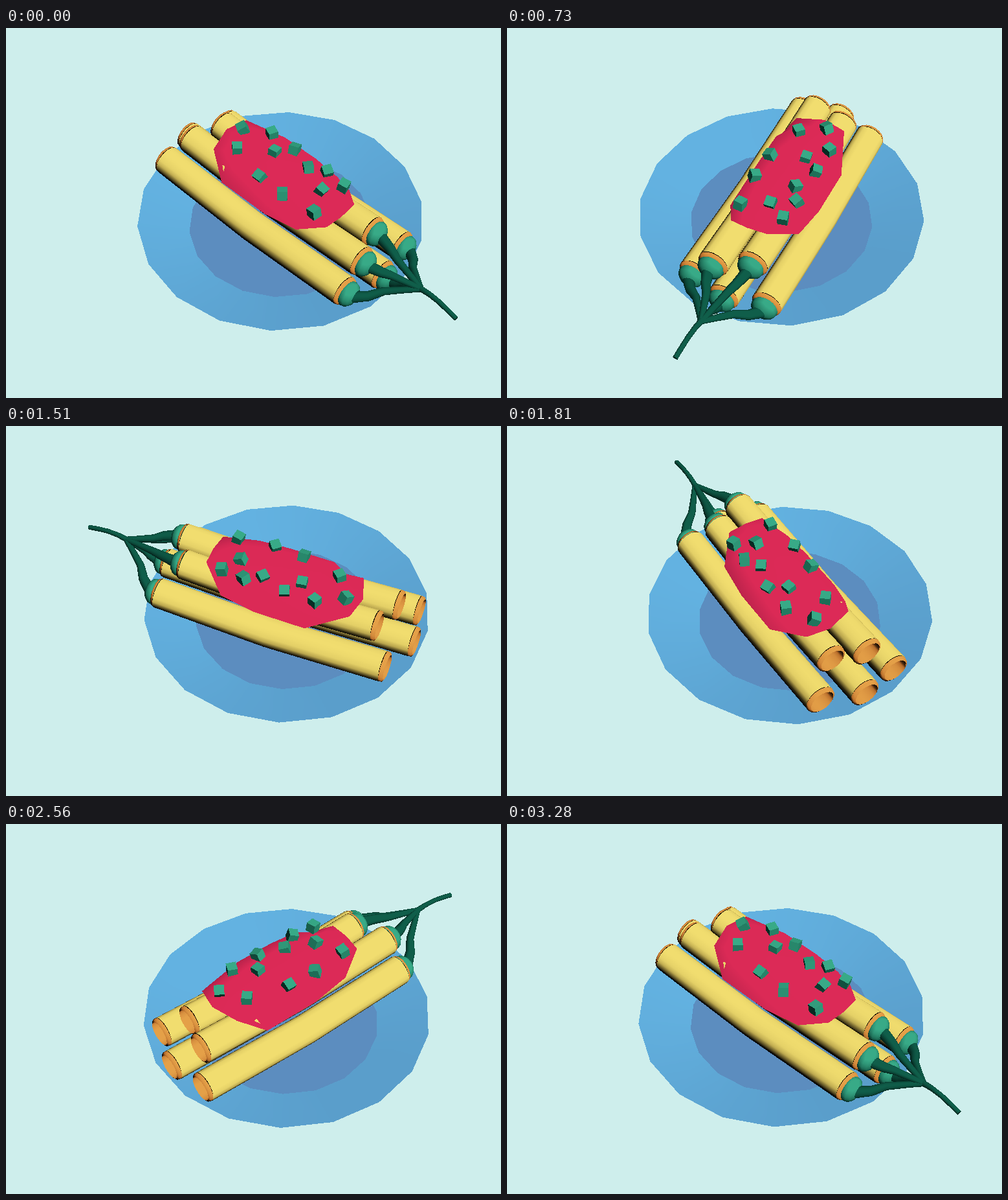
These frames come from a looping animation (765 by 571 pixels, 3310 ms). An HTML page with a canvas:

```html
<!DOCTYPE html>
<html lang="en">
<head>
<meta charset="utf-8">
<title>Turntable dish</title>
<style>
html, body { margin: 0; width: 100%; height: 100%; overflow: hidden; background: #ceeeec; }
canvas { display: block; }
</style>
</head>
<body>
<canvas id="stage" width="765" height="571"></canvas>
<script>
const W = 765, H = 571, TAU = Math.PI * 2;
const ctx = document.getElementById('stage').getContext('2d');
const image = ctx.createImageData(W, H);
const pixels = new Uint32Array(image.data.buffer);
const nearness = new Float32Array(W * H);

const rgb = (r, g, b) => (255 << 24 | b << 16 | g << 8 | r) >>> 0;
const BACK = rgb(206, 238, 236);

// Colour ramp over brightness 0..1, from stops [level, r, g, b].
function ramp(...stops) {
  return Uint32Array.from({ length: 256 }, (_, i) => {
    const v = i / 255;
    let k = 0;
    while (k < stops.length - 2 && v > stops[k + 1][0]) k++;
    const p = stops[k], q = stops[k + 1];
    const f = Math.min(1, Math.max(0, (v - p[0]) / (q[0] - p[0])));
    return rgb(...[1, 2, 3].map(c => Math.round(p[c] + (q[c] - p[c]) * f)));
  });
}
const YELLOW = ramp([0, 10, 8, 2], [.1, 72, 62, 28], [.37, 186, 166, 78], [.6, 227, 207, 102], [.85, 241, 221, 111]);
const ORANGE = ramp([0, 24, 12, 4], [.25, 180, 106, 42], [.5, 210, 138, 60], [.9, 228, 160, 72]);
const GREEN = ramp([0, 6, 42, 34], [.3, 28, 106, 84], [.85, 56, 170, 135]);
const STEM = ramp([0, 5, 36, 29], [.85, 16, 94, 74]);
const SAUCE = ramp([0, 130, 22, 54], [.35, 178, 33, 72], [.65, 219, 42, 86], [1, 220, 42, 87]);
const RIM = ramp([.67, 90, 158, 203], [.95, 99, 178, 225]);
const WELL = ramp([0, 91, 140, 190], [1, 92, 141, 191]);

// Model space: a runs along the rolls towards the stem, b across them, h is up.
const verts = [], faces = [];
function vert(pos, normal) {
  const len = Math.hypot(...normal);
  const v = { pos, normal: normal.map(n => n / len) };
  verts.push(v);
  return v;
}
function quad(mat, p, q, r, s) {
  faces.push([mat, p, q, r], [mat, p, r, s]);
}
function grid(mat, rows) {
  for (let i = 1; i < rows.length; i++) {
    const n = rows[i].length;
    for (let j = 0; j < n; j++) {
      const k = (j + 1) % n;
      quad(mat, rows[i - 1][j], rows[i - 1][k], rows[i][k], rows[i][j]);
    }
  }
}
const around = (n, make) => Array.from({ length: n }, (_, j) => make((j + .5) / n * TAU));

// Round skin along path points [a, b, h, radius]; side -1 lights the inside.
function sweep(mat, path, side = 1) {
  grid(mat, path.map((p, i) => {
    const prev = path[Math.max(i - 1, 0)], next = path[Math.min(i + 1, path.length - 1)];
    const step = [0, 1, 2].map(k => next[k] - prev[k]);
    const len = Math.hypot(...step), d = step.map(x => x / len);
    const slope = (next[3] - prev[3]) / len;
    const m = Math.hypot(d[0], d[1]);
    const u = [d[1] / m, -d[0] / m, 0];
    const w = [u[1] * d[2], -u[0] * d[2], u[0] * d[1] - u[1] * d[0]];
    return around(18, t => {
      const out = u.map((x, k) => x * Math.cos(t) + w[k] * Math.sin(t));
      return vert(out.map((x, k) => p[k] + x * p[3]), out.map((x, k) => (x - slope * d[k]) * side));
    });
  }));
}

function plate() {
  const circle = (r, h, tilt) => around(18, t => {
    const x = Math.cos(t), y = Math.sin(t);
    return vert([x * r - 1, y * r + 7.3, h], [-x * tilt, -y * tilt, 1]);
  });
  grid(RIM, [circle(220.5, 0, .3), circle(142, -24, .3)]);
  grid(WELL, [circle(142, -24, 0), circle(0, -24, 0)]);
}

const JOINT = [270, 0, 47];
function roll(a0, a1, b, h) {
  const R = 23.5, along = list => list.map(([a, r]) => [a, b, h, r]);
  const body = [];
  for (let i = 0; i <= 10; i++) {
    const f = i / 10;
    body.push([a0 + 5 + (a1 - a0 - 7) * f, b, h - 8 * (1 - Math.abs(2 * f - 1)), R]);
  }
  sweep(YELLOW, body);
  sweep(ORANGE, along([[a0 + 5, R], [a0 + 1, 22.8], [a0 - 1, 19.5]]));
  sweep(ORANGE, along([[a0 - 1, 19.5], [a0 + 45, 19.5]]), -1);
  sweep(ORANGE, along([[a1 - 2, R], [a1 + 2, 22], [a1 + 3, 18]]));
  sweep(GREEN, along([[a1 + 1, 18], [a1 + 5, 20.5], [a1 + 11, 19], [a1 + 16, 14], [a1 + 19, 7], [a1 + 20, 2]]));
  const tip = [a1 + 14, b, h];
  const at = (f, r, shift) => [...tip.map((x, k) => x + (JOINT[k] - x) * f + (k ? 0 : shift)), r];
  sweep(STEM, [at(0, 9, 0), at(.22, 7.5, 2), at(.5, 6, -5), at(.75, 5, -3), at(1, 4, 0)]);
}

function sauce() {
  const edge = [[118, 4, 86], [115, 32, 85], [75, 54, 66], [14, 58, 56], [-76, 58, 56], [-114, 36, 85],
    [-128, -6, 87], [-121, -42, 85], [-60, -66, 56], [20, -66, 56], [78, -60, 62], [116, -27, 86]];
  const rings = [[1, 0, 1.3], [.8, 89, .7], [.45, 92, .25], [0, 93, 0]];
  grid(SAUCE, rings.map(([f, top, lean]) => edge.map(([a, b, h]) => {
    const da = a + 5, db = b + 4;
    return vert([da * f - 5, db * f - 4, top || h], [da / 400 * lean, db / 62 * lean, 1]);
  })));
}

function cube(a, b, i) {
  const yaw = i * 2.4 + .4, tip = Math.sin(i * 5.1) * .45, size = 7.5;
  const c = Math.cos(yaw), s = Math.sin(yaw), ct = Math.cos(tip), st = Math.sin(tip);
  const axes = [[c, s, 0], [-s * ct, c * ct, st], [s * st, -c * st, ct]];
  for (let k = 0; k < 3; k++) for (const side of [-1, 1]) {
    const n = axes[k].map(x => x * side), u = axes[(k + 1) % 3], w = axes[(k + 2) % 3];
    quad(GREEN, ...[[-1, -1], [1, -1], [1, 1], [-1, 1]].map(([p, q]) =>
      vert([a, b, 95].map((x, j) => x + size * (n[j] + p * u[j] + q * w[j])), n)));
  }
}

plate();
roll(-200, 181, 62, 20);
roll(-177, 181, 28, 59);
roll(-213, 201, 1.5, 20);
roll(-161, 157, -24, 61);
roll(-189, 186, -60, 20);
sweep(STEM, [[268, 0, 47, 4.5], [285, 1, 50, 4], [303, 2, 50, 3.8], [320, 3, 47, 3.8], [337, 4, 43, 3.8]]);
sauce();
[[-66, -42], [-18, -42], [48, -42], [85, -38], [-106, -19], [-36, -17], [23, -28], [67, -9],
  [-82, 17], [-18, 34], [30, 36], [88, 30]].forEach(([a, b], i) => cube(a, b, i));

// Camera looks down at the turntable; the light stays with the camera.
const DIST = 2057, SIN = .76, COS = .65, LIGHT = [.35, .39, .85];
function project(v, c, s) {
  const [a, b, h] = v.pos, [na, nb, nh] = v.normal;
  const x = a * c - b * s, z = a * s + b * c;
  v.w = DIST / (DIST - z * COS - h * SIN);
  v.x = 430 + x * v.w;
  v.y = 283.3 + (z * SIN - h * COS) * v.w;
  const lit = (na * c - nb * s) * LIGHT[0] + (na * s + nb * c) * LIGHT[1] + nh * LIGHT[2];
  v.lit = 255 * Math.min(1, Math.max(0, lit));
}

function fill([mat, p, q, r]) {
  const qx = q.x - p.x, qy = q.y - p.y, rx = r.x - p.x, ry = r.y - p.y;
  const area = qx * ry - rx * qy;
  if (Math.abs(area) < 1e-6) return;
  const x0 = Math.max(0, Math.ceil(Math.min(p.x, q.x, r.x) - .5));
  const x1 = Math.min(W - 1, Math.floor(Math.max(p.x, q.x, r.x) - .5));
  const y0 = Math.max(0, Math.ceil(Math.min(p.y, q.y, r.y) - .5));
  const y1 = Math.min(H - 1, Math.floor(Math.max(p.y, q.y, r.y) - .5));
  for (let y = y0; y <= y1; y++) {
    const dy = y + .5 - p.y;
    for (let x = x0; x <= x1; x++) {
      const dx = x + .5 - p.x;
      const f = (dx * ry - rx * dy) / area, g = (qx * dy - dx * qy) / area;
      if (f < -1e-6 || g < -1e-6 || f + g > 1.000001) continue;
      const w = p.w + (q.w - p.w) * f + (r.w - p.w) * g, i = y * W + x;
      if (w <= nearness[i]) continue;
      nearness[i] = w;
      pixels[i] = mat[Math.min(255, Math.max(0, p.lit + (q.lit - p.lit) * f + (r.lit - p.lit) * g)) | 0];
    }
  }
}

function draw(step) {
  const turn = 43.1 + 3.357 * step - .35 - 1.15 * Math.sin((step - 12) / 107.3 * TAU);
  const c = Math.cos(turn * TAU / 360), s = Math.sin(turn * TAU / 360);
  pixels.fill(BACK);
  nearness.fill(0);
  verts.forEach(v => project(v, c, s));
  faces.forEach(fill);
  ctx.putImageData(image, 0, 0);
}

let shown = -1;
function tick() {
  const t = performance.now() % 3310;
  const step = t < 100 ? 0 : 1 + Math.floor((t - 100) / 30);
  if (step !== shown) draw(shown = step);
  requestAnimationFrame(tick);
}
tick();
</script>
</body>
</html>
```
